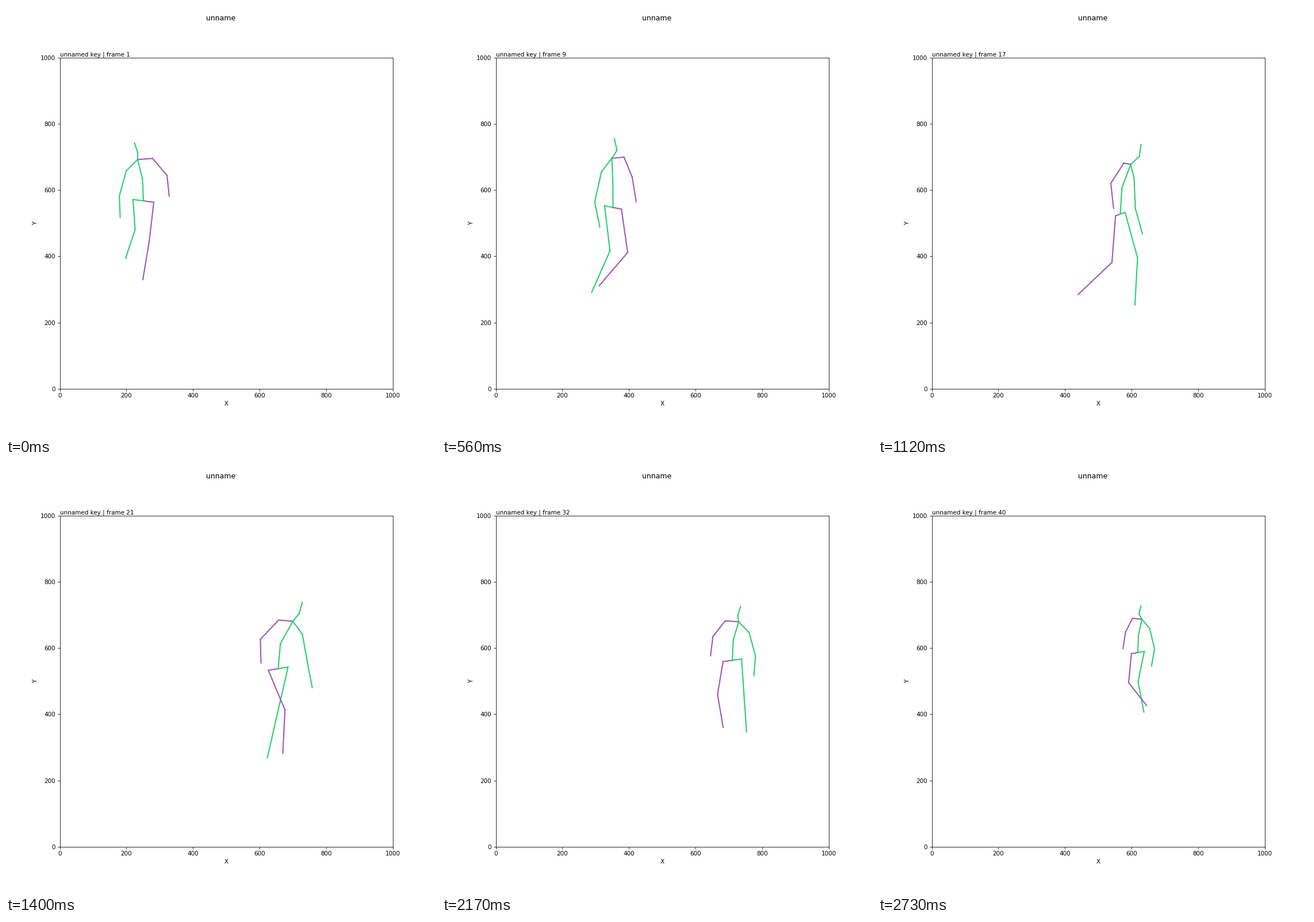
A matplotlib script for the animation above (2800 ms loop, 748 by 748 pixels).

```python
import numpy as np
import matplotlib.pyplot as plt
from matplotlib.animation import FuncAnimation

SIZE, INCHES = 748, 10
FRAMES, INTERVAL = 40, 70
GREEN, PURPLE = "#2ecc71", "#9b59b6"
NOW = np.arange(FRAMES)

# Walk path in stage pixels (y down) and heading in degrees (0 = facing right).
TIMES = [0, 8, 16, 20, 24, 31, 39]
PELVIS = [(239, 339), (297.5, 350.5), (421.5, 362), (473.5, 356),
          (502.5, 350), (505, 341.5), (452, 328)]
THORAX = [(229, 267), (295.5, 265), (439.5, 275.5), (499, 273.5),
          (519, 273), (516, 274.5), (459, 270)]
HEADING = [-77, -42, 22, 54, 66, 110, 131]

# Ankle places at each lift-off and landing, half a stride apart.
HALF_STRIDE = 5
R_STEPS = [(208, 439), (257, 497), (262, 499), (446, 521), (454.5, 511.5),
           (526, 484), (537, 470), (467, 436), (462, 431)]
L_STEPS = [(238, 476), (240, 476), (335, 506), (348, 502), (497, 503),
           (496, 490), (489, 458), (488, 452), (456, 403)]

CHAINS = [
    (GREEN, "pelvis r_hip r_knee r_ankle"),
    (PURPLE, "pelvis l_hip l_knee l_ankle"),
    (GREEN, "pelvis spine thorax neck head"),
    (PURPLE, "thorax l_shoulder l_elbow l_wrist"),
    (GREEN, "thorax r_shoulder r_elbow r_wrist"),
]


def curve(values):
    """Sample a cubic Hermite curve through the key values at every frame."""
    t, p = np.array(TIMES, float), np.array(values, float).reshape(len(TIMES), -1)
    slope = np.gradient(p, t, axis=0, edge_order=2)
    i = np.clip(np.searchsorted(t, NOW, side="right") - 1, 0, len(t) - 2)
    h = (t[i + 1] - t[i])[:, None]
    u = (NOW - t[i])[:, None] / h
    return ((1 + 2 * u) * (1 - u) ** 2 * p[i] + u * (1 - u) ** 2 * h * slope[i]
            + u * u * (3 - 2 * u) * p[i + 1] + u * u * (u - 1) * h * slope[i + 1])


def stride(steps, start):
    """Ease the ankle from one step place to the next."""
    p = np.array(steps, float)
    phase = np.clip((NOW - start) / HALF_STRIDE, 0, len(p) - 1.001)
    i = phase.astype(int)
    u = (phase - i)[:, None]
    return p[i] + (p[i + 1] - p[i]) * u * u * (3 - 2 * u)


def bend(hip, ankle):
    """Place the knee between hip and ankle, bent towards the heading."""
    span = ankle - hip
    length = np.hypot(span[:, 0], span[:, 1])
    bulge = np.sqrt(np.maximum((76 * scale) ** 2 - (length / 2) ** 2, 0))
    normal = np.column_stack([span[:, 1], -span[:, 0]]) / length[:, None]
    return (hip + ankle) / 2 + normal * (bulge * forward)[:, None]


def offset(parent, side, ahead, down):
    """Step from a joint along the body's right side, its heading and down."""
    x = scale * (side * sideways + ahead * forward)
    return parent + np.column_stack([x, scale * down])


def build_joints():
    j = {"pelvis": pelvis, "thorax": thorax}
    j["spine"] = pelvis + (thorax - pelvis) * [0.15, 0.525]
    j["neck"] = offset(thorax, 3, 14, -13)
    j["head"] = offset(j["neck"], 6.5, 0, -19)

    j["r_shoulder"] = offset(thorax, 22, -3, 22)
    j["r_elbow"] = offset(j["r_shoulder"], 13, -3, 49)
    j["r_wrist"] = offset(j["r_elbow"], 1, 12, 41)
    j["l_shoulder"] = offset(thorax, -29.5, 0, -2)
    j["l_elbow"] = offset(j["l_shoulder"], -31, -10, 32.5)
    j["l_wrist"] = offset(j["l_elbow"], -3, 6, 40)

    j["r_hip"] = offset(pelvis, 20.5, 0, -2.7)
    j["l_hip"] = 2 * pelvis - j["r_hip"]
    j["r_ankle"] = stride(R_STEPS, 0)
    j["l_ankle"] = stride(L_STEPS, 1)
    for s in "rl":
        j[s + "_knee"] = bend(j[s + "_hip"], j[s + "_ankle"])
    return j


def to_data(px):
    """Convert stage pixels to axis units."""
    box = ax.get_position()
    x = (px[:, 0] / SIZE - box.x0) / box.width
    y = (1 - px[:, 1] / SIZE - box.y0) / box.height
    return 1000 * np.column_stack([x, y])


fig, ax = plt.subplots(figsize=(INCHES, INCHES), dpi=SIZE / INCHES)
fig.suptitle("unname")
ax.set(xlim=(0, 1000), ylim=(0, 1000), xlabel="X", ylabel="Y")
label = ax.text(0, 1, "", transform=ax.transAxes, va="bottom")

pelvis, thorax = curve(PELVIS), curve(THORAX)
scale = (pelvis - thorax)[:, 1] / 80
heading = np.radians(curve(HEADING)[:, 0])
forward, sideways = np.cos(heading), np.sin(heading)
joints = {name: to_data(px) for name, px in build_joints().items()}

bones = []
for color, chain in CHAINS:
    names = chain.split()
    for a, b in zip(names, names[1:]):
        line, = ax.plot([], [], color=color, lw=2)
        bones.append((line, joints[a], joints[b]))


def update(frame):
    label.set_text(f"unnamed key | frame {frame + 1}")
    for line, a, b in bones:
        line.set_data([a[frame, 0], b[frame, 0]], [a[frame, 1], b[frame, 1]])
    return [label] + [bone[0] for bone in bones]


anim = FuncAnimation(fig, update, frames=FRAMES, interval=INTERVAL, repeat=True)
plt.show()
```
